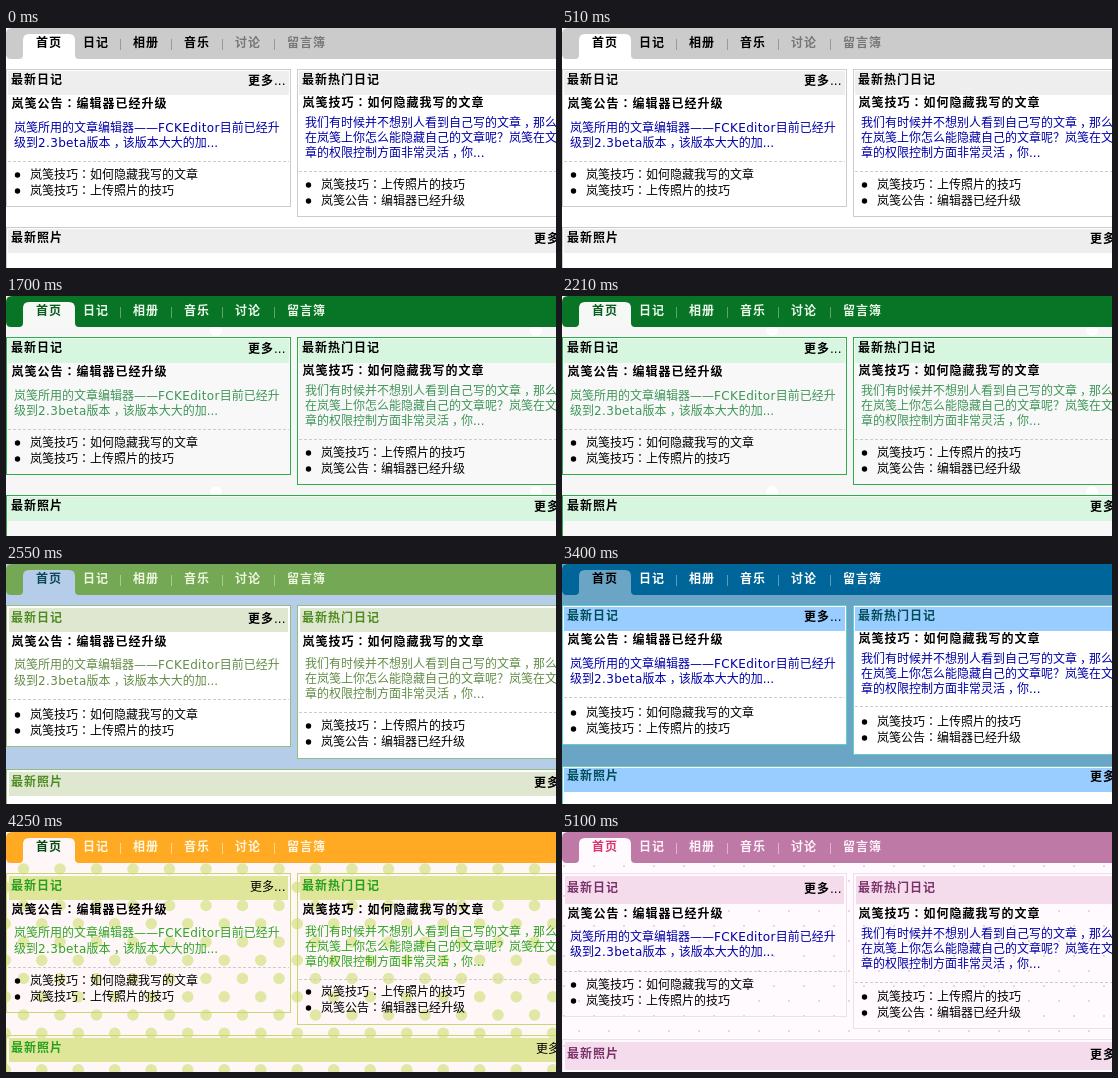
An HTML page that plays this animation: 550x240 px, repeating every 5950 ms.

```html
<!DOCTYPE html>
<html lang="zh-CN">
<head>
<meta charset="utf-8">
<title>Blog themes</title>
<style>
html, body { margin: 0; width: 100%; height: 100%; overflow: hidden; }
svg { display: block; width: 550px; height: 240px; }
text { font: 12px "DejaVu Sans", "Noto Sans CJK SC", sans-serif; white-space: pre; }
.b { font-family: "Noto Sans CJK SC", sans-serif; font-weight: bold; letter-spacing: 1px; }
.latin { letter-spacing: .35px; }
text .mid { font-family: "Noto Sans CJK TC", sans-serif; }
</style>
</head>
<body>
<svg id="stage" viewBox="0 0 550 240"></svg>
<script>
const STEP = 850;
const BRAND = '岚笺';

// Row positions are text centres; "end" is the panel's lower edge.
const rows = (head, title, para, gap, dash, list, end) =>
  ({ head, title, para, gap, dash, list, end });
const compact = {
  left: rows(52, 76, 100, 15, 133, 147, 179),
  right: rows(52, 75, 95, 15, 143, 157, 189),
  bottom: 199, photo: 210, pad: 2, band: 24
};

const plain = {
  page: '#fff', panel: '#fff', border: '#cccccc', band: '#eeeeee',
  head: '#000', link: '#0000aa', tab: '#fff', tabText: '#000', at: compact
};

const themes = [
  { ...plain, bar: '#cbcbcb', nav: '#000', navOff: '#777', sep: '#999' },
  { ...plain, bar: '#000', nav: '#fff', sep: '#555' },
  {
    page: '#f6f6f6', panel: '#f8f8f8', border: '#2fac4c', band: '#d7f6df',
    head: '#000', link: '#3f9659', tab: '#f6f8f6', tabText: '#075c1e',
    bar: '#087426', nav: '#e9f8e9', sep: '#58a66b', at: compact,
    dots: { dx: 320, dy: 162, x: 210, y: 34, r: 6, fill: '#fff', sx: -41, sy: 42 }
  },
  {
    page: '#b5cde8', panel: '#fff', border: '#91bd7d', band: '#dfe7d0',
    head: '#4d8c20', link: '#648d48', tab: '#b5cde8', tabText: '#0a4858',
    bar: '#75a854', nav: '#edf7df', sep: '#a5cc91',
    at: {
      left: rows(54, 78, 101, 16, 135, 151, 183),
      right: rows(54, 78, 100, 15, 148, 162, 195),
      bottom: 205, photo: 218, pad: 3, band: 24
    }
  },
  {
    page: '#6ba5c5', panel: '#fff', border: '#65cccc', band: '#99ccff',
    head: '#004d55', link: '#0000aa', tab: '#6ba5c5', tabText: '#000',
    bar: '#006699', nav: '#fff', sep: '#5c9dbd',
    at: {
      left: rows(52, 76, 100, 15, 133, 149, 181),
      right: rows(52, 75, 95, 15, 142, 158, 191),
      bottom: 202, photo: 212, pad: 2, band: 24
    }
  },
  {
    page: '#fff7f7', panel: 'none', border: '#c6d870', band: '#dfe69a',
    head: '#27a01e', link: '#30a426', tab: '#fff7f7', tabText: '#044d18',
    bar: '#ffaa22', nav: '#fff7df', sep: '#ffd58d', lightMore: true,
    dots: { dx: 36.5, dy: 36.5, x: 17.5, y: .5, r: 5.8, fill: '#e1e8a6', sx: 18.25, sy: 18.25 },
    at: {
      left: rows(54, 78, 101, 16, 135, 149, 181),
      right: rows(54, 78, 100, 15, 147, 160, 193),
      bottom: 203, photo: 216, pad: 3, band: 24
    }
  },
  {
    page: '#fffafd', panel: 'none', border: '#f0dfea', band: '#f5dced',
    head: '#7a3068', link: '#0000aa', tab: '#fffafd', tabText: '#d8386e',
    bar: '#bf79a7', nav: '#fff2fa', sep: '#dfb3d0',
    dots: { dx: 30, dy: 30, x: 2, y: 4, r: 1, fill: '#e4c8da', sx: 15, sy: 15 },
    at: {
      left: rows(56, 82, 105, 15, 139, 153, 185),
      right: rows(56, 82, 102, 15, 150, 165, 197),
      bottom: 207, photo: 222, pad: 3, band: 28
    }
  }
];

const content = {
  left: {
    head: '最新日记', title: BRAND + '公告：编辑器已经升级',
    para: [BRAND + '所用的文章编辑器——FCKEditor目前已经升', '级到2.3beta版本，该版本大大的加...'],
    list: [BRAND + '技巧：如何隐藏我写的文章', BRAND + '技巧：上传照片的技巧']
  },
  right: {
    head: '最新热门日记', title: BRAND + '技巧：如何隐藏我写的文章',
    para: ['我们有时候并不想别人看到自己写的文章，那么',
      `在${BRAND}上你怎么能隐藏自己的文章呢？${BRAND}在文`,
      '章的权限控制方面非常灵活，你...'],
    list: [BRAND + '技巧：上传照片的技巧', BRAND + '公告：编辑器已经升级']
  }
};

const rect = (x, y, w, h, fill, more = '') =>
  `<rect x="${x}" y="${y}" width="${w}" height="${h}" fill="${fill}" ${more}/>`;

const circle = (x, y, r, fill) => `<circle cx="${x}" cy="${y}" r="${r}" fill="${fill}"/>`;

// Colons and commas sit in the middle of their cells.
function text(x, mid, str, fill = '#000', bold = false) {
  const body = str
    .replace(/[A-Za-z0-9.]{4,}/g, '<tspan class="latin">$&</tspan>')
    .replace(/：/g, '<tspan class="mid" lang="zh-TW">：</tspan>')
    .replace(/，./g, '<tspan dx="3 -3">$&</tspan>');
  return `<text x="${x}" y="${mid + 4}" fill="${fill}"${bold ? ' class="b"' : ''}>${body}</text>`;
}

function pattern({ dx, dy, x, y, r, fill, sx, sy }) {
  let out = '';
  for (let py = y - dy; py < 250; py += dy)
    for (let px = x - dx; px < 590; px += dx)
      out += circle(px, py, r, fill) + circle(px + sx, py + sy, r, fill);
  return out;
}

function header(t) {
  const labels = ['日记', '相册', '音乐', '讨论', '留言簿'];
  const xs = [77, 127, 178, 229, 281];
  return `<path d="M560 0H6Q0 0 0 6V26Q0 31 5 31H560Z" fill="${t.bar}"/>` +
    `<path d="M13 31Q17 31 17 27V12Q17 6 23 6H63Q69 6 69 12V27Q69 31 73 31Z" fill="${t.tab}"/>` +
    text(30, 15, '首页', t.tabText, true) +
    labels.map((s, i) => text(xs[i], 15, s, i > 2 && t.navOff || t.nav, true)).join('') +
    [114, 165, 216, 268].map(x => rect(x, 11, 1, 11, t.sep)).join('');
}

function frame(t, x, y, w, h) {
  const { pad, band } = t.at;
  return rect(x + .5, y + .5, w - 1, h - 1, t.panel, `stroke="${t.border}"`) +
    rect(x + pad, y + pad, w - 2 * pad, band, t.band);
}

function panel(t, side, x, w) {
  const p = t.at[side], c = content[side];
  return frame(t, x, 41, w, p.end - 41) +
    text(x + 5, p.head, c.head, t.head, true) +
    text(x + 5.5, p.title, c.title, '#000', true) +
    c.para.map((s, i) => text(x + 8, p.para + i * p.gap, s, t.link)).join('') +
    `<path d="M${x + 2} ${p.dash + .5}H${x + w - 2}" stroke="#ccc" stroke-dasharray="3 2"/>` +
    c.list.map((s, i) => circle(x + 11.5, p.list + i * 16, 2.7, '#000') +
      text(x + 24, p.list + i * 16, s)).join('');
}

function more(t, x, y) {
  const bold = !t.lightMore;
  const left = bold ? x : x + 2;
  return text(left, y, '更多', '#000', bold) +
    `<g font-weight="bold">${text(left + (bold ? 26 : 24), y, '...')}</g>`;
}

function scene(t) {
  const { at } = t;
  return '<g display="none">' + rect(0, 0, 550, 240, t.page) +
    (t.dots ? pattern(t.dots) : '') + header(t) +
    panel(t, 'left', 0, 285) + more(t, 242, at.left.head + 1) +
    panel(t, 'right', 291, 285) +
    frame(t, 0, at.bottom, 576, 80) +
    text(5, at.photo, '最新照片', t.head, true) + more(t, 528, at.photo + 1) + '</g>';
}

const stage = document.getElementById('stage');
stage.innerHTML = themes.map(scene).join('');
const scenes = [...stage.children];
let shown = -1;

function draw(now) {
  const i = Math.floor(now / STEP) % scenes.length;
  if (i !== shown) {
    scenes.forEach((g, k) => g.setAttribute('display', k === i ? 'inline' : 'none'));
    shown = i;
  }
}

const start = performance.now();
function tick() {
  draw(performance.now() - start);
  requestAnimationFrame(tick);
}
tick();
</script>
</body>
</html>
```
